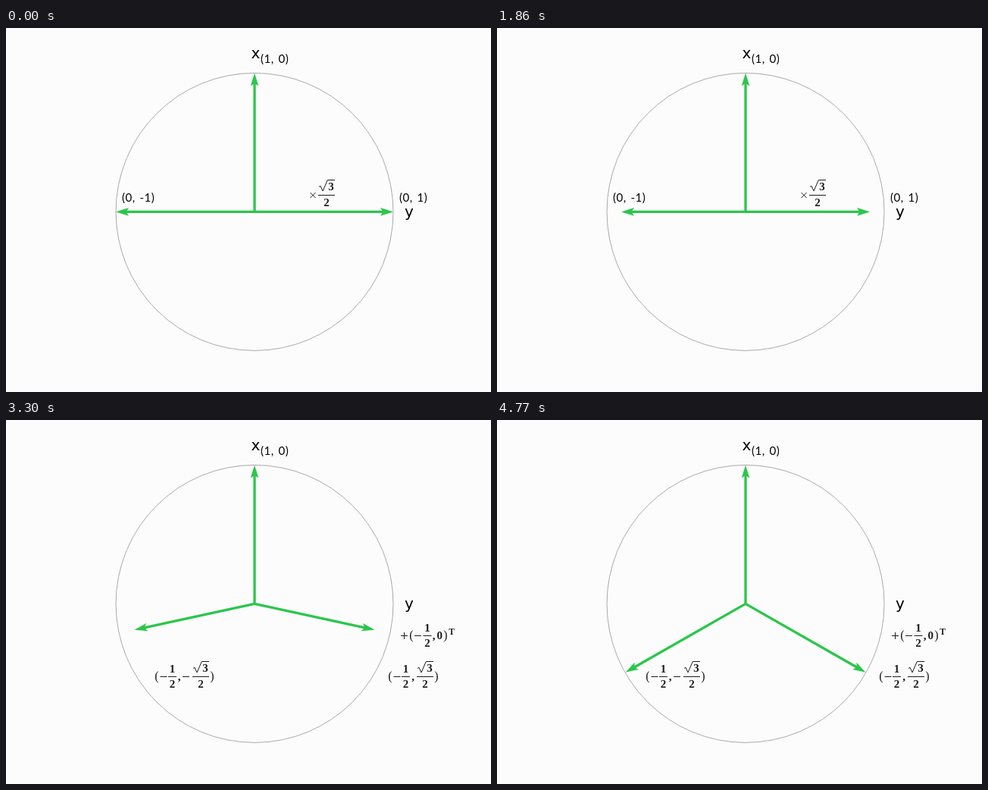
Recreate the animation shown at these times as an HTML page with a canvas. Size 640 by 480 pixels, loop 4.8 s.

```html
<!DOCTYPE html>
<html>
<head>
<meta charset="utf-8">
<style>
  html, body { margin: 0; width: 100%; height: 100%; overflow: hidden; background: #fcfcfc; }
  canvas { display: block; }
</style>
</head>
<body>
<canvas id="stage" width="640" height="480"></canvas>
<script>
const ctx = document.getElementById('stage').getContext('2d');
const LOOP = 4800, HALF = LOOP / 2, STEP = 30;
const CX = 328, CY = 242.4, R = 183;
const GREEN = '#2bc64b', INK = '#1c1c1c';
const SANS = '15px Lato, sans-serif';
const AXIS = '20px "DejaVu Sans", sans-serif';
const BOLD = 'bold 15px "Liberation Serif", serif';
const THIN = '16px "Liberation Serif", serif';

function text(str, x, y, font, align = 'center', color = INK) {
  ctx.font = font;
  ctx.textAlign = align;
  ctx.fillStyle = color;
  ctx.fillText(str, x, y);
}

function label(str, x, y) {
  ctx.letterSpacing = '0.5px';
  ctx.wordSpacing = '1.5px';
  text(str, x, y, SANS, 'left', '#000');
  ctx.letterSpacing = ctx.wordSpacing = '0px';
}

function line(points, width = 1, color = INK) {
  ctx.beginPath();
  points.forEach(([x, y]) => ctx.lineTo(x, y));
  ctx.lineWidth = width;
  ctx.strokeStyle = color;
  ctx.stroke();
}

// Math pieces: x is the centre, y the height of the fraction bar.
const paren = (ch, x, y) => text(ch, x, y + 4.5, THIN);
const minus = (x, y) => line([[x - 4.5, y], [x + 4.5, y]]);

function half(x, y) {
  text('1', x, y - 5.5, BOLD);
  text('2', x, y + 14.5, BOLD);
  line([[x - 5.5, y], [x + 5.5, y]]);
}

function rootHalf(x, y) {
  text('3', x + 6, y - 6.5, BOLD);
  text('2', x, y + 14.5, BOLD);
  line([[x - 11, y], [x + 11, y]]);
  line([[x - 10, y - 11], [x - 8, y - 12.2], [x - 5, y - 5.5], [x + 1.3, y - 20], [x + 11, y - 20]]);
}

function arrow(dx, dy) {
  const length = Math.hypot(dx, dy);
  ctx.save();
  ctx.translate(CX, CY);
  ctx.rotate(Math.atan2(dy, dx));
  line([[0, 0], [length - 10, 0]], 3.3, GREEN);
  ctx.translate(length, 0);
  ctx.beginPath();
  ctx.moveTo(0, 0);
  ctx.quadraticCurveTo(-9, -2.8, -17, -5.3);
  ctx.lineTo(-13.5, 0);
  ctx.lineTo(-17, 5.3);
  ctx.quadraticCurveTo(-9, 2.8, 0, 0);
  ctx.fillStyle = GREEN;
  ctx.fill();
  ctx.restore();
}

function scalingLabels() {
  label('(0, -1)', 153, 229);
  label('(0, 1)', 519, 229);
  line([[401.5, 217], [408.5, 224]]);
  line([[408.5, 217], [401.5, 224]]);
  rootHalf(423, 220.5);
}

function shiftLabels() {
  const top = 284.5, low = 338.5;
  minus(525.5, top);
  line([[525.5, top - 4.5], [525.5, top + 4.5]]);
  paren('(', 535, top);
  minus(543.5, top);
  half(556, top);
  text(',', 564.5, 289, BOLD);
  text('0', 572.3, 289, BOLD);
  paren(')', 580, top);
  text('T', 588, 283, 'bold 11.5px "Liberation Serif", serif');

  paren('(', 507, low);
  minus(516, low);
  half(527.5, low);
  text(',', 537, 343, BOLD);
  rootHalf(553, low);
  paren(')', 568, low);

  paren('(', 199, low);
  minus(208, low);
  half(219.5, low);
  text(',', 228.5, 343, BOLD);
  minus(237.5, low);
  rootHalf(257, low);
  paren(')', 272, low);
}

function draw(now) {
  const t = Math.floor(now % LOOP / STEP) * STEP;
  const squeeze = Math.min(t / HALF, 1);
  const shift = Math.max(t / HALF - 1, 0);
  const dx = R * (1 - squeeze * (1 - Math.sqrt(3) / 2));
  const dy = R * shift / 2;

  ctx.fillStyle = '#fcfcfc';
  ctx.fillRect(0, 0, 640, 480);
  ctx.beginPath();
  ctx.arc(CX, CY, R, 0, 2 * Math.PI);
  ctx.lineWidth = 1;
  ctx.strokeStyle = '#aaa';
  ctx.stroke();

  arrow(0, -R);
  arrow(dx, dy);
  arrow(-dx, dy);

  text('x', 323.5, 39.5, AXIS, 'left', '#000');
  text('y', 526, 248.5, AXIS, 'left', '#000');
  label('(1, 0)', 336, 46);
  if (t < HALF) scalingLabels();
  else shiftLabels();
}

const start = performance.now();
function tick() {
  draw(performance.now() - start);
  requestAnimationFrame(tick);
}
tick();
</script>
</body>
</html>
```
